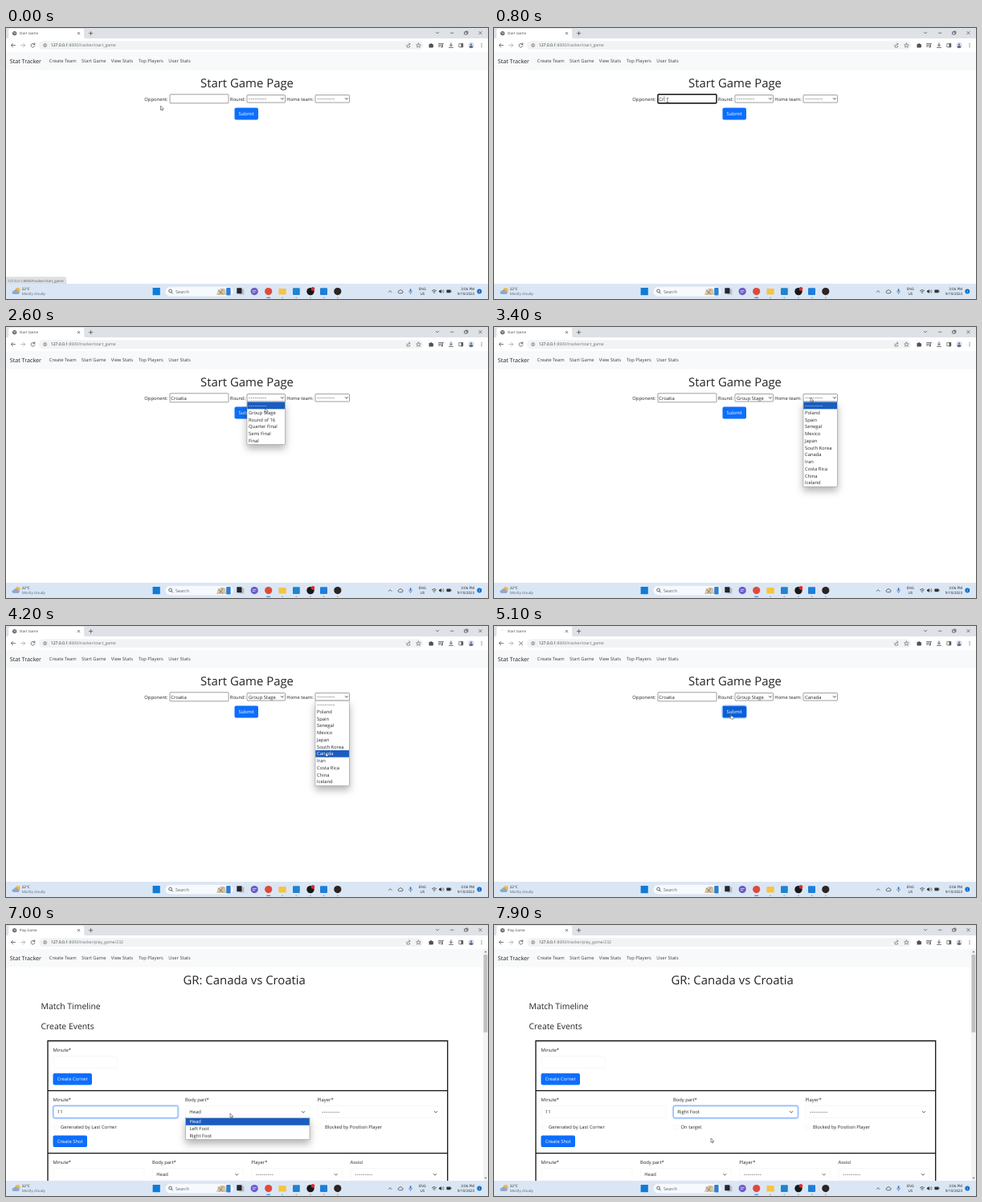
Recreate the animation shown at these times as an HTML page. Size 600 by 338 pixels, loop 8 s.

```html
<!DOCTYPE html>
<html lang="en">
<head>
<meta charset="utf-8">
<title>Stat Tracker</title>
<style>
html, body { margin: 0; width: 100%; height: 100%; overflow: hidden; background: #fff; }
svg { display: block; width: 600px; height: 338px; }
text { font-family: "Open Sans", "Noto Sans", sans-serif; text-rendering: geometricPrecision; white-space: pre; }
.dash { font-family: Inter, sans-serif; }
.menu { filter: drop-shadow(0 5px 5px rgba(0, 0, 0, .3)); }
</style>
</head>
<body>
<svg id="stage" viewBox="0 0 600 338"></svg>
<script>
const LOOP = 8000, STEP = 100, SIZE = 5.85;
const INK = '#212529', BLUE = '#0d6efd', PICK = '#1a5cc0', DASHES = '---------';
const LOAD = 4900, ARRIVE = 5300;
const stage = document.getElementById('stage');
const timed = [];

// Drawing helpers
function add(parent, tag, attrs = {}) {
  const el = document.createElementNS('http://www.w3.org/2000/svg', tag);
  for (const key in attrs) el.setAttribute(key, attrs[key]);
  parent.appendChild(el);
  return el;
}
const group = (parent, attrs) => add(parent, 'g', attrs);
const rect = (p, x, y, width, height, fill, more) => add(p, 'rect', { x, y, width, height, fill, ...more });
const dot = (p, cx, cy, r, fill, more) => add(p, 'circle', { cx, cy, r, fill, ...more });
const line = (p, d, stroke = '#444', width = .7, more) =>
  add(p, 'path', { d, stroke, fill: 'none', 'stroke-width': width, 'stroke-linecap': 'round', 'stroke-linejoin': 'round', ...more });
const shape = (p, d, fill, more) => add(p, 'path', { d, fill, ...more });

// Text is placed by its left edge and the middle of its capitals
function text(p, x, mid, str, size = SIZE, fill = INK, more = {}) {
  const dash = str === DASHES;
  const s = dash ? 5.4 : size;
  const el = add(p, 'text', { x, y: mid + s * .36, 'font-size': s, fill, ...more });
  if (dash) el.setAttribute('class', 'dash');
  el.textContent = str;
  return el;
}
const heading = (p, x, mid, str, size, more) => text(p, x, mid, str, size, INK, { 'font-weight': 500, ...more });
const MIDDLE = { 'text-anchor': 'middle' }, END = { 'text-anchor': 'end' };

function during(el, from, to = LOOP) {
  timed.push({ el, from, to });
  return el;
}
const setShown = (el, on) => el.setAttribute('visibility', on ? 'inherit' : 'hidden');

function button(p, x, y, w, h, label) {
  const box = rect(p, x, y, w, h, BLUE, { rx: 2 });
  text(p, x + w / 2, y + h / 2, label, SIZE, '#fff', MIDDLE);
  return box;
}
const chevron = (p, x, y, s = 1.7, color = '#333') =>
  line(p, `M${x - s} ${y - s / 2}l${s} ${s}l${s} ${-s}`, color, .8);

function makeMenu(p, x, y, w, pitch, items, from, to) {
  const g = during(group(p, { class: 'menu' }), from, to);
  rect(g, x, y, w, pitch * items.length + .8, '#fff', { stroke: '#8a8a8a', 'stroke-width': .5 });
  const bar = rect(g, x + .3, y + .4, w - .6, pitch, PICK);
  const labels = items.map((s, i) => text(g, x + (w > 100 ? 5 : 2), y + .3 + pitch * (i + .5), s));
  return cy => {
    const at = Math.max(0, Math.min(items.length - 1, Math.floor((cy - y) / pitch)));
    bar.setAttribute('y', y + .4 + at * pitch);
    labels.forEach((el, i) => el.setAttribute('fill', i === at ? '#fff' : INK));
  };
}

// First page: start a game
rect(stage, 0, 0, 600, 338, '#fff');
const start = during(group(stage), 0, ARRIVE);
heading(start, 300, 68.3, 'Start Game Page', 14.9, MIDDLE);
text(start, 172.3, 88.6, 'Opponent:');
text(start, 278.8, 88.6, 'Round:');
text(start, 349.2, 88.6, 'Home team:');
rect(start, 204, 82.8, 73, 11, '#fff', { rx: .8, stroke: '#767676', 'stroke-width': .7 });
during(rect(start, 204, 82.8, 73, 11, '#fff', { rx: 1, stroke: '#101010', 'stroke-width': 1.4 }), 700, 2300);
const opponent = text(start, 205.3, 88.6, '');
const nameCaret = line(start, 'M0 85.5v6', '#222', .5);

function nativeSelect(x, w, value, chosenAt) {
  rect(start, x, 83.6, w, 9.4, '#fff', { rx: .8, stroke: '#767676', 'stroke-width': .7 });
  during(text(start, x + 2, 88.4, DASHES), 0, chosenAt);
  during(text(start, x + 2, 88.4, value), chosenAt);
  chevron(start, x + w - 3.7, 88.4, 1.5, '#222');
}
nativeSelect(300, 47.5, 'Group Stage', 2900);
nativeSelect(385, 42.5, 'Canada', 4300);
const submit = button(start, 284.5, 99.6, 29.5, 14.8, 'Submit');
during(rect(start, 284, 99.1, 30.5, 15.8, 'none', { rx: 2.5, stroke: '#86b7fe', 'stroke-width': 1 }), LOAD);

const roundMenu = makeMenu(start, 300, 93.2, 47.5, 8.76,
  [DASHES, 'Group Stage', 'Round of 16', 'Quarter Final', 'Semi Final', 'Final'], 2300, 2900);
const teamMenu = makeMenu(start, 385, 93.2, 42.3, 8.76,
  [DASHES, 'Poland', 'Spain', 'Senegal', 'Mexico', 'Japan', 'South Korea', 'Canada', 'Iran', 'Costa Rica', 'China', 'Iceland'], 3200, 4300);

// Second page: record events
const play = during(group(stage), ARRIVE);
heading(play, 296.7, 68.5, 'GR: Canada vs Croatia', 14.9, MIDDLE);
heading(play, 43.5, 101.6, 'Match Timeline', 10.4);
heading(play, 43.5, 126.6, 'Create Events', 10.4);
line(play, 'M52 340V144.5H549.7V340M52 206.6H549.7M52 284.6H549.7', '#111', 1.3, { 'stroke-linejoin': 'miter' });

function field(x, y, w, label, value, isSelect = true) {
  text(play, x - .4, y - 7.5, label);
  rect(play, x, y, w, 15, '#fff', { rx: 2, stroke: '#eceef1', 'stroke-width': .5 });
  if (value) text(play, x + 5, y + 7.7, value);
  if (value && isSelect) chevron(play, x + w - 8, y + 7.7);
}
const ring = (x, w, from, to) => during(rect(play, x, 225.6, w, 15, '#fff',
  { rx: 2, stroke: '#86b7fe', 'stroke-width': 1.1, style: 'filter:drop-shadow(0 0 .8px #86b7fe)' }), from, to);

field(59, 163.6, 79, 'Minute*');
button(play, 58.5, 185, 48.5, 14.6, 'Create Corner');
field(59, 225.6, 155, 'Minute*');
field(223.3, 225.6, 155, 'Body part*', '');
field(388, 225.6, 155, 'Player*', DASHES);
ring(59, 155, 6100, 7200);
ring(223.3, 155, 7200);
const minute = text(play, 63.8, 233.3, '');
const minuteCaret = line(play, 'M64.3 230v6.6', '#222', .5);
const spin = during(group(play), 6000, 6800);
shape(spin, 'M204.4 232.2l1.6-2l1.6 2zM204.4 234.4l1.6 2l1.6-2z', '#444');
during(text(play, 228.3, 233.3, 'Head'), ARRIVE, 7500);
during(text(play, 228.3, 233.3, 'Right Foot'), 7500);
chevron(play, 370.2, 233.3);
[[59, 'Generated by Last Corner'], [223.5, 'On target'], [388, 'Blocked by Position Player']].forEach(([x, s]) => {
  rect(play, x, 249, 5.6, 5.6, '#fff', { rx: 1.2, stroke: '#eceef1', 'stroke-width': .5 });
  text(play, x + 9, 252, s);
});
button(play, 58.5, 262.5, 42.5, 14.6, 'Create Shot');
field(59, 303.6, 113, 'Minute*');
field(182.3, 303.6, 113, 'Body part*', 'Head');
field(305.7, 303.6, 113, 'Player*', DASHES);
field(429, 303.6, 113, 'Assist', DASHES);
const bodyMenu = makeMenu(play, 223.5, 240.6, 154.5, 8.76, ['Head', 'Left Foot', 'Right Foot'], 6900, 7500);

// Navigation bar
rect(stage, 0, 30, 600, 22.5, '#f8f9fa');
text(stage, 4.7, 41.4, 'Stat Tracker', 7.2);
[[53.8, 'Create Team'], [94, 'Start Game'], [130.8, 'View Stats'], [165, 'Top Players'], [202.3, 'User Stats']]
  .forEach(([x, s]) => text(stage, x, 41.4, s, 5.8, '#3c4045'));

const scroll = during(group(stage), ARRIVE);
rect(scroll, 593.8, 30, 6.2, 289, '#f3f3f3');
rect(scroll, 594.5, 37, 4.8, 97, '#c1c1c1');
shape(scroll, 'M595.4 34.3l1.6-2l1.6 2zM595.4 314.8l1.6 2l1.6-2z', '#777');

// Browser frame
rect(stage, 0, 0, 600, 13.2, '#dee1e6');
rect(stage, 0, 13, 600, 17, '#fff');
shape(stage, 'M1 13.2Q3.3 13.2 3.3 10.5V3Q3.3 .8 5.5 .8H95Q97.2 .8 97.2 3V10.5Q97.2 13.2 99.5 13.2Z', '#fff');
const globe = (from, to) => {
  const g = during(group(stage), from, to);
  dot(g, 10.7, 6.6, 2.6, '#50545a');
  line(g, 'M9.3 5.5l1.4 .6l-.6 1.5M11.6 4.8l.5 1.4l-.8 1.6', '#fff', .6);
};
globe(0, LOAD);
globe(ARRIVE);
during(line(stage, 'M8.7 5.5a2.2 2.2 0 0 1 2-1.1', '#c9ccd1', .6), LOAD, ARRIVE);
during(text(stage, 16.8, 6.6, 'Start Game', 4.4, '#444'), 0, ARRIVE);
during(text(stage, 16.8, 6.6, 'Play Game', 4.4, '#444'), ARRIVE);
line(stage, 'M89.2 5.3l2.6 2.6M91.8 5.3l-2.6 2.6M103.4 6.6h4.4M105.6 4.4v4.4');
line(stage, 'M535.3 5.2l1.8 1.8l1.8-1.8M553.3 6.2h3.6M571 5h3v3h-3zM572 5v-.9h3v3h-.9M588.8 4.4l3.4 3.4M592.2 4.4l-3.4 3.4', '#333', .6);

line(stage, 'M11.5 21.6h-5M8.6 19.4l-2.2 2.2l2.2 2.2', '#505357', .8);
line(stage, 'M18.7 21.6h5M21.6 19.4l2.2 2.2l-2.2 2.2', '#a5a8ab', .8);
const reload = [[0, LOAD], [5400, LOOP]];
reload.forEach(([a, b]) => during(line(stage, 'M35.4 20.2a2.4 2.4 0 1 0 .5 1.9M35.8 18.7v1.8h-1.8', '#505357', .8), a, b));
during(line(stage, 'M31.6 19.6l4 4M35.6 19.6l-4 4', '#505357', .8), LOAD, 5400);

rect(stage, 41, 16.2, 478, 10.8, '#f1f3f4', { rx: 5.4 });
dot(stage, 48.6, 21.6, 2, 'none', { stroke: '#555', 'stroke-width': .6 });
line(stage, 'M48.6 21.4v1.1M48.6 20.5v.1', '#555', .6);
[['start_game', 0, ARRIVE], ['play_game/232', ARRIVE, LOOP]].forEach(([page, a, b]) => {
  const url = during(text(stage, 55.8, 21.6, '', 5.07, '#6a6e73'), a, b);
  add(url, 'tspan', { fill: '#26282b' }).textContent = '127.0.0.1';
  add(url, 'tspan').textContent = ':8000/tracker/' + page;
});
line(stage, 'M499 21v3h3.6v-1.4M500.3 22c.2-1.4 1-2 2.5-2M501.8 18.8l1.3 1.2l-1.3 1.2', '#555', .6);
line(stage, 'M513.5 19l.8 1.8l2 .2l-1.5 1.3l.5 1.9l-1.8-1l-1.8 1l.5-1.9l-1.5-1.3l2-.2z', '#555', .6);
shape(stage, 'M526.5 20h1.7a.9 .9 0 0 1 1.8 0h1.6v1.5a1 1 0 0 1 0 1.9v1.1h-5.1z', '#4d5156');
line(stage, 'M538.5 19.6h4M538.5 21.3h4M538.5 23h2.2M543.4 23.4v-4h1.2', '#4d5156', .8);
dot(stage, 542.6, 23.5, .9, '#4d5156');
line(stage, 'M554 18.8v3.6M552.4 21l1.6 1.6l1.6-1.6M551.6 24.3h4.8', '#4d5156', .9);
rect(stage, 563.8, 19.3, 5, 4.6, 'none', { stroke: '#4d5156', 'stroke-width': .7, rx: .4 });
rect(stage, 566.5, 19.3, 2.3, 4.6, '#4d5156');
dot(stage, 579, 21.6, 3.6, '#d4dbe8');
shape(stage, 'M576.4 24.1q.3-2 2.6-2t2.6 2q-2.6 2-5.2 0z', '#5b6785');
dot(stage, 579, 20.6, 1.1, '#5b6785');
[19.6, 21.6, 23.6].forEach(y => dot(stage, 592, y, .55, '#4d5156'));

// Link preview
const status = during(group(stage), 0, 400);
shape(status, 'M0 310.8H73.2Q74.7 310.8 74.7 312.3V319H0Z', '#dee1e6', { stroke: '#c3c6ca', 'stroke-width': .4 });
text(status, 1.8, 315, '127.0.0.1:8000/tracker/start_game', 4.38, '#55585c');

// Taskbar
rect(stage, 0, 319, 600, 19, '#dbe6f4');
dot(stage, 14.6, 327, 2.9, '#f6b73c');
shape(stage, 'M9.3 332a2 2 0 0 1 .3-4a2.7 2.7 0 0 1 5-.2a2.2 2.2 0 0 1 .8 4.2z', '#8fa9c9');
text(stage, 19.8, 325.4, '22°C', 4.5, '#222');
text(stage, 19.8, 331.8, 'Mostly cloudy', 4.5, '#5d6570');
rect(stage, 182.6, 324, 9.2, 9.2, '#0f7bd8');
rect(stage, 198, 322.6, 85, 12.2, '#f6f9fd', { rx: 6.1, stroke: '#d3dce8', 'stroke-width': .4 });
dot(stage, 204.6, 328, 1.9, 'none', { stroke: '#333', 'stroke-width': .7 });
line(stage, 'M206 329.5l1.5 1.6', '#333', .8);
text(stage, 211, 328.6, 'Search', 5.4, '#5d6269');
shape(stage, 'M262 333l2-6l4-2.5l5 1l1 7.5z', '#d7c6a4');
line(stage, 'M264 327l6 5M270 326l-4 6', '#7c6a50', .7);
rect(stage, 274.2, 324, 5.4, 9.4, '#2f7fd0', { rx: 1.2 });
rect(stage, 290.4, 325.6, 6, 7, '#b9bec6', { rx: .5 });
rect(stage, 287.3, 324.2, 6.2, 7, '#23262b', { rx: .5 });
dot(stage, 309.2, 328.6, 4.6, '#6b58c9');
line(stage, 'M307.2 327.6h4M307.2 329.6h2.6', '#fff', .7);
dot(stage, 326.7, 328.6, 4.6, '#e0493b');
rect(stage, 339.4, 325, 9.4, 7.6, '#f6c445', { rx: .8 });
rect(stage, 357, 324.2, 8.8, 8.8, '#1f84d0', { rx: 1 });
dot(stage, 379, 328.6, 4.7, '#17181b');
dot(stage, 382, 325.4, 2.3, '#e02b2b');
rect(stage, 391, 324.2, 9, 8.8, '#1c7fdc', { rx: 1 });
dot(stage, 412.8, 328.6, 4.6, '#2b2423');
[344, 361.4, 379, 395.6, 412.8].forEach(x => rect(stage, x - 1, 335.8, 2, .9, '#8a929c', { rx: .45 }));
rect(stage, 324.2, 335.7, 5, 1, '#1a73d0', { rx: .5 });

line(stage, 'M476.4 329.5l1.8-1.8l1.8 1.8', '#333', .7);
line(stage, 'M489 330.6a1.4 1.4 0 0 1 .2-2.7a2 2 0 0 1 3.7 0a1.4 1.4 0 0 1 .4 2.7z', '#333', .7);
rect(stage, 502.7, 325.2, 1.8, 3.8, '#3a6fb5', { rx: .9 });
line(stage, 'M501.6 328.3a2 2 0 0 0 4 0M503.6 330.4v1.2', '#3a6fb5', .6);
text(stage, 518.3, 325.4, 'ENG', 4.5, '#222', MIDDLE);
text(stage, 518.3, 331.8, 'US', 4.5, '#222', MIDDLE);
line(stage, 'M530.4 327.6a3.7 3.7 0 0 1 5.2 0M531.6 329a2 2 0 0 1 2.8 0', '#222', .7);
dot(stage, 533, 330.5, .6, '#222');
shape(stage, 'M539 327.5h1.2l1.6-1.5v5l-1.6-1.5h-1.2z', '#222');
line(stage, 'M543 327.4a1.6 1.6 0 0 1 0 2.2M544.2 326.4a3 3 0 0 1 0 4.2', '#222', .5);
rect(stage, 548.4, 326.6, 5.2, 3.6, '#333', { rx: .7 });
rect(stage, 553.9, 327.7, .6, 1.4, '#333');
text(stage, 583.2, 325.4, '3:06 PM', 4.5, '#222', END);
text(stage, 583.2, 331.8, '9/10/2023', 4.5, '#222', END);
dot(stage, 589.3, 328.5, 2.9, '#0a6cc4');
text(stage, 589.3, 328.5, '2', 3.8, '#fff', MIDDLE);

// Mouse pointer
const pointer = group(stage);
const kinds = { arrow: group(pointer), beam: group(pointer), hand: group(pointer) };
shape(kinds.arrow, 'M0 0V5.3L1.2 4.2L2 6L2.9 5.6L2.1 3.9H3.8Z', '#fff', { stroke: '#222', 'stroke-width': .5 });
line(kinds.beam, 'M-1.1 -2.7q1.1 0 1.1 .7V2q0 .7 -1.1 .7M1.1 -2.7q-1.1 0 -1.1 .7M0 2q0 .7 1.1 .7', '#222', .5);
shape(kinds.hand, 'M-.5 .3q.6-.7 1.1 0V2.4l2.4 .6q.6 .2 .5 1L3 6H.2L-1.5 3.8q.1-.8 1 0z', '#fff', { stroke: '#222', 'stroke-width': .5 });

const path = [
  [0, 192.5, 97, 'arrow'], [200, 192.5, 97, 'arrow'], [600, 216, 90, 'beam'], [1800, 216, 90, 'beam'],
  [2200, 324, 88, 'arrow'], [2400, 324, 88, 'arrow'], [2700, 322, 106, 'arrow'], [2900, 322, 106, 'arrow'],
  [3200, 394, 88, 'arrow'], [3500, 394, 88, 'arrow'], [4100, 398, 158, 'arrow'], [4300, 398, 158, 'arrow'],
  [4800, 295, 110, 'hand'], [5300, 295, 110, 'arrow'], [5500, 295, 110, 'arrow'], [6000, 145, 234, 'beam'],
  [6600, 145, 234, 'beam'], [6800, 279, 235, 'arrow'], [7100, 279, 235, 'arrow'],
  [7400, 270, 262, 'arrow'], [7500, 270, 262, 'arrow'], [7700, 270, 266, 'arrow'], [LOOP, 270, 266, 'arrow']
];
function pointerAt(t) {
  const i = path.findIndex((p, n) => n + 1 === path.length || t < path[n + 1][0]);
  const a = path[i], b = path[i + 1] || a;
  const u = (t - a[0]) / (b[0] - a[0] || 1), e = u * u * (3 - 2 * u);
  return { x: a[1] + (b[1] - a[1]) * e, y: a[2] + (b[2] - a[2]) * e, kind: a[3] };
}

// Typing
const nameKeys = [700, 800, 1000, 1100, 1200, 1300, 1500], minuteKeys = [6500, 6600];
const typed = (str, keys, t) => str.slice(0, keys.filter(k => t >= k).length);

function render(t) {
  timed.forEach(({ el, from, to }) => setShown(el, t >= from && t < to));
  const p = pointerAt(t);
  pointer.setAttribute('transform', `translate(${p.x} ${p.y})`);
  for (const k in kinds) setShown(kinds[k], k === p.kind);
  [roundMenu, teamMenu, bodyMenu].forEach(mark => mark(p.y));
  submit.setAttribute('fill', t >= 4800 ? '#0b5ed7' : BLUE);

  opponent.textContent = typed('Croatia', nameKeys, t);
  nameCaret.setAttribute('transform', `translate(${205.8 + opponent.getComputedTextLength()} 0)`);
  setShown(nameCaret, t >= 700 && t < 1800);
  minute.textContent = typed('11', minuteKeys, t);
  minuteCaret.setAttribute('transform', `translate(${minute.getComputedTextLength()} 0)`);
  setShown(minuteCaret, t >= 6100 && t < 6900);
}

const begin = performance.now();
function tick() {
  const t = (performance.now() - begin) % LOOP;
  render(Math.floor(t / STEP) * STEP);
  requestAnimationFrame(tick);
}
tick();
</script>
</body>
</html>
```
